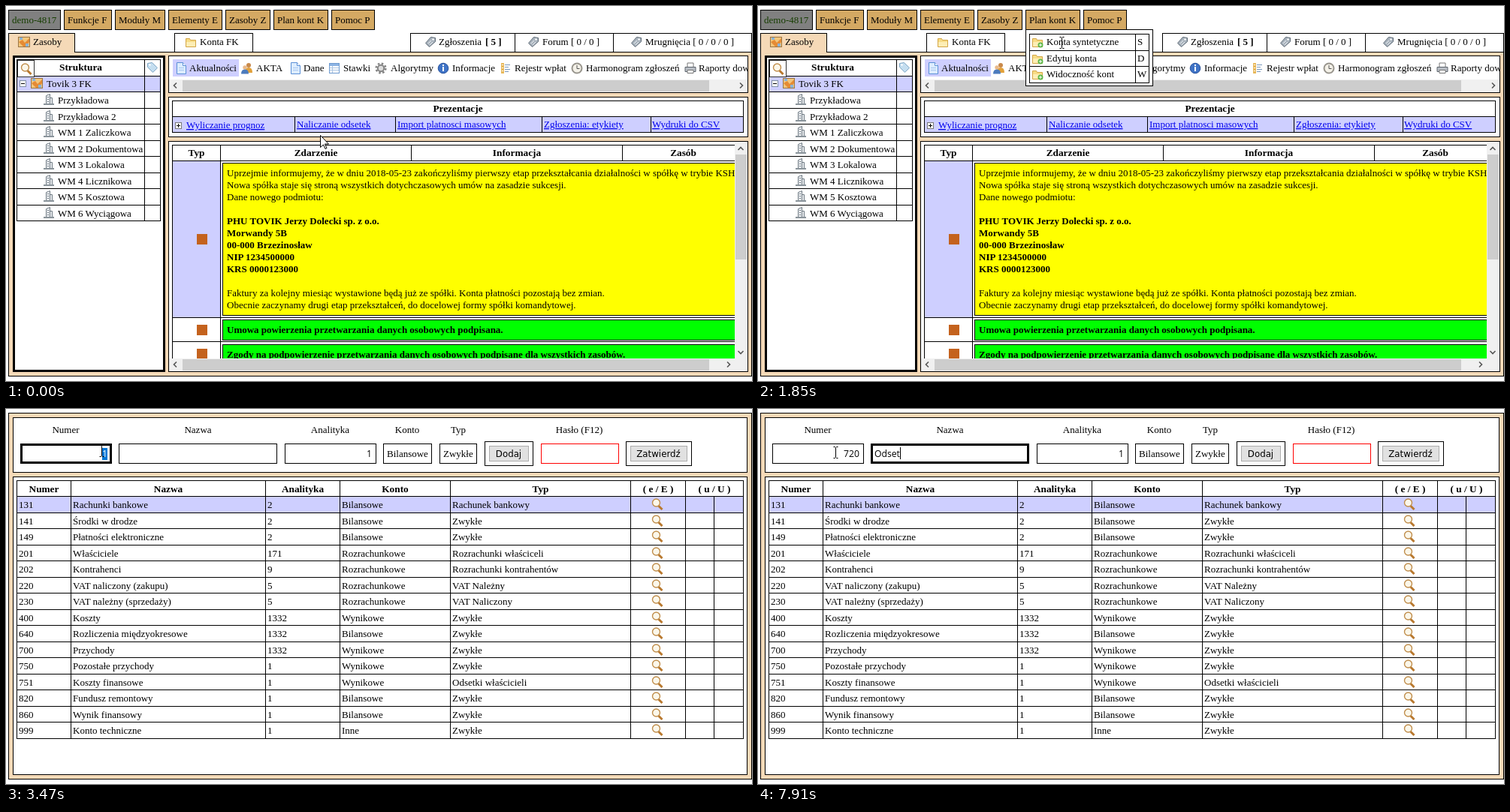
Write an HTML page that moves like this. It is 993x500 px and loops after 8 s.

```html
<!DOCTYPE html>
<html lang="pl">
<head>
<meta charset="utf-8">
<title>Plan kont</title>
<style>
html, body { margin: 0; width: 100%; height: 100%; overflow: hidden; background: #fff; }
#stage { display: block; width: 993px; height: 500px; }
text { font: 13px "Liberation Serif", "Times New Roman", serif; white-space: pre; }
rect { shape-rendering: crispEdges; }
.b { font-weight: bold; }
.h { font-weight: bold; font-size: 13.3px; }
.u { fill: #00e; text-decoration: underline; }
.in { font: 12.2px "Open Sans", sans-serif; }
.btn { font: 11.8px "DejaVu Sans", sans-serif; }
</style>
</head>
<body>
<svg id="stage" viewBox="0 0 993 500"></svg>
<script>
const WHEAT = '#f5d9b7', TAN = '#d4a963', LILAC = '#cecfff', LOOP = 8000;

// Drawing helpers; boxes are given by their outer border pixels.
const fill = (x, y, w, h, c) => `<rect x="${x}" y="${y}" width="${w}" height="${h}" fill="${c}"/>`;
const box = (x, y, x2, y2, c = '#fff', line = '#000', w = 1) =>
  `<rect x="${x + w / 2}" y="${y + w / 2}" width="${x2 - x + 1 - w}" height="${y2 - y + 1 - w}" fill="${c}" stroke="${line}" stroke-width="${w}"/>`;
const hline = (x, y, x2) => fill(x, y, x2 - x + 1, 1, '#000');
const vline = (x, y, y2) => fill(x, y, 1, y2 - y + 1, '#000');
const text = (x, y, s, cls = '', anchor = 'start', c = '#000') =>
  `<text x="${x}" y="${y}" class="${cls}" text-anchor="${anchor}" ${cls === 'u' ? '' : `fill="${c}"`}>${s}</text>`;
const mid = (x, y, s, cls = 'h') => text(x, y, s, cls, 'middle');
const clip = (x, y, w, h, body) =>
  `<svg x="${x}" y="${y}" width="${w}" height="${h}" viewBox="${x} ${y} ${w} ${h}">${body}</svg>`;
const path = (d, c, line = 'none', w = 1) => `<path d="${d}" fill="${c}" stroke="${line}" stroke-width="${w}"/>`;
const disc = (x, y, r, c, line = 'none', w = 1) =>
  `<circle cx="${x}" cy="${y}" r="${r}" fill="${c}" stroke="${line}" stroke-width="${w}"/>`;

const icons = {
  folder: path('M1.5 3.5h5l1 2h7v9h-13z', '#f7dc86', '#d3a545') + path('M2 8h12v6H2z', '#fdeeb5'),
  map: box(0, 1, 15, 14, '#f2c67c', '#9b7645') + path('M1 8l5-3 3 4 6-6v5l-5 6H7z', '#e58b35')
    + path('M2 2h4v3H2zM10 10h4v4h-4z', '#8ab4d8'),
  tag: path('M1.5 2.5l6-1 7 7-6 6-7-7z', '#c4def0', '#7fa6c4') + disc(4.5, 4.5, 1.2, '#fff'),
  darkTag: path('M14.5 2.5l-6-1-7 8 5 5 8-7z', '#a9b3bd', '#5e6a76') + disc(11.5, 4.5, 1.2, '#fff')
    + path('M5 10l4-4M7 12l4-4', 'none', '#eef2f5'),
  doc: path('M2.5.5h8l4 4v11h-12z', '#dcecff', '#5b8fd6') + path('M10.5.5v4h4', '#fff', '#5b8fd6')
    + path('M5 7.5h7M5 10.5h7', 'none', '#a9c8ee'),
  people: disc(10, 4, 3, '#c98a4b') + path('M5 14q0-7 5-7t5 7z', '#e2a13a') + disc(5, 7, 2.7, '#e9b98a')
    + path('M0 15.5q0-6 5-6t5 6z', '#4c7bbd'),
  sheet: box(1, 1, 14, 14, '#fff', '#6f9bd0') + fill(2, 2, 12, 3, '#8db4e3') + path('M2 7.5h12M2 10.5h12M5.500 5v9', 'none', '#a9c3e2'),
  gear: disc(8, 8, 6.3, 'none', '#858585', 2.6).replace('/>', ' stroke-dasharray="2.5 2.45"/>') + disc(8, 8, 4.2, '#ddd', '#858585', 2),
  info: disc(8, 8, 6.8, '#3f73c6', '#27519b') + fill(7, 3, 2, 2, '#fff') + fill(7, 6, 2, 6, '#fff'),
  list: fill(2, 1, 4, 14, '#e8b95c') + path('M3 3.500h2M3 7.500h2M3 11.500h2', 'none', '#fff')
    + path('M7 3.500h7M7 6.500h5M7 9.500h7M7 12.500h5', 'none', '#7897bd'),
  clock: disc(8, 8, 6.5, '#f4f1e8', '#98958d', 2) + path('M8 4v4.500h3.500', 'none', '#555'),
  printer: path('M4 1h8v6H4z', '#fff', '#777') + path('M1 6.500h14v6H1z', '#b9bec5', '#5f666e') + path('M4 10.500h8v4H4z', '#fff', '#777'),
  house: path('M4.500 2.500l5-2v13h-5zM9.500 5.500h3v8h-3z', '#e9ecef', '#6f7a83')
    + path('M6 4.500h2M6 7.500h2M6 10.500h2', 'none', '#6f7a83') + fill(1, 13, 14, 2, '#8a949b'),
  lens: path('M9.500 10l5 5', 'none', '#b9792f', 3) + disc(6.500, 6, 5, '#fbf7ea', '#c08e4c', 1.4)
};
icons.addFolder = icons.folder + disc(12, 12, 3.500, '#5eb648') + path('M10 12h4M12 10v4', 'none', '#fff');
const icon = (name, x, y) => `<g transform="translate(${x} ${y})">${icons[name]}</g>`;

const chevron = (x, y, angle) =>
  `<path transform="translate(${x} ${y}) rotate(${angle})" d="M-3.500 2L0-1.500 3.500 2" fill="none" stroke="#555" stroke-width="1.6"/>`;
const hscroll = (y, right) => fill(217, y, right - 217, 17, '#f0f0f0') + fill(235, y + 1, 701, 15, '#cdcdcd')
  + chevron(225, y + 8, -90) + chevron(right - 8, y + 8, 90);

function menuBar() {
  const items = [[3, 72, 'demo-4817'], [77, 140, 'Funkcje F'], [145, 211, 'Moduły M'], [216, 287, 'Elementy E'],
    [292, 351, 'Zasoby Z'], [356, 428, 'Plan kont K'], [433, 490, 'Pomoc P']];
  return items.map(([x, x2, s], i) => box(x, 5, x2, 31, i ? TAN : '#808080')
    + text(x + 5, 23, s, '', 'start', i ? '#000' : '#163d00')).join('');
}

function tabs() {
  return box(3, 36, 91, 62, WHEAT) + icon('map', 16, 40) + text(36, 52, 'Zasoby')
    + box(224, 36, 328, 61) + icon('folder', 238, 40) + text(258, 52, 'Konta FK')
    + box(538, 36, 992, 61) + vline(677, 36, 60) + vline(808, 36, 60)
    + icon('darkTag', 557, 40) + text(576, 52, 'Zgłoszenia') + text(638, 52, '[ 5 ]', 'b')
    + icon('darkTag', 694, 40) + text(714, 52, 'Forum [ 0 / 0 ]')
    + icon('darkTag', 831, 40) + text(851, 52, 'Mrugnięcia [ 0 / 0 / 0 ]')
    + box(3, 61, 992, 493, WHEAT) + fill(4, 61, 87, 1, WHEAT);
}

function tree() {
  const rows = ['Przykładowa', 'Przykładowa 2', 'WM 1 Zaliczkowa', 'WM 2 Dokumentowa', 'WM 3 Lokalowa',
    'WM 4 Licznikowa', 'WM 5 Kosztowa', 'WM 6 Wyciągowa'];
  let out = box(9, 66, 211, 487, '#fff', '#000', 3) + box(14, 71, 205, 286) + fill(15, 94, 190, 20, LILAC)
    + hline(14, 93, 205) + box(15, 72, 37, 94, '#fff', '#333') + icon('lens', 19, 76)
    + mid(99.500, 86, 'Struktura') + icon('tag', 187, 74)
    + box(18, 99, 26, 107, '#fff', '#8190a5') + hline(20, 103, 24) + icon('map', 33, 95) + text(54, 108, 'Tovik 3 FK');
  rows.forEach((s, i) => {
    const y = Math.round(114 + 21.500 * i);
    out += hline(14, y, 205) + icon('house', 49, y + 3) + text(69, y + 16, s);
  });
  return out + vline(184, 71, 286);
}

function toolbar() {
  const items = [['doc', 225, 244, 'Aktualności'], ['people', 313, 333, 'AKTA'], ['doc', 377, 396, 'Dane'],
    ['sheet', 429, 449, 'Stawki'], ['gear', 491, 512, 'Algorytmy'], ['info', 574, 594, 'Informacje'],
    ['list', 657, 677, 'Rejestr wpłat'], ['clock', 752, 772, 'Harmonogram zgłoszeń'], ['printer', 903, 922, 'Raporty dowolne']];
  return box(216, 66, 987, 115) + fill(222, 71, 88, 23, LILAC)
    + clip(217, 67, 770, 31, items.map(([name, x, tx, s]) => icon(name, x, 75) + text(tx, 87, s)).join(''))
    + hscroll(98, 987);
}

function links() {
  const items = [[240, 'Wyliczanie prognoz'], [387, 'Naliczanie odsetek'], [521, 'Import platnosci masowych'],
    [716, 'Zgłoszenia: etykiety'], [860, 'Wydruki do CSV']];
  return box(216, 121, 987, 174) + box(221, 126, 981, 168) + mid(601.500, 141, 'Prezentacje')
    + box(221, 147, 981, 168, LILAC) + [384, 518, 713, 858].map(x => vline(x, 147, 168)).join('')
    + box(225, 155, 233, 163, '#fff', '#777') + hline(227, 159, 231) + vline(229, 157, 161)
    + items.map(([x, s], i) => text(x, i ? 162 : 163, s, 'u')).join('');
}

function news() {
  const lines = ['Uprzejmie informujemy, że w dniu 2018-05-23 zakończyliśmy pierwszy etap przekształcania działalności w spółkę w trybie KSH',
    'Nowa spółka staje się stroną wszystkich dotychczasowych umów na zasadzie sukcesji.', 'Dane nowego podmiotu:', '',
    'PHU TOVIK Jerzy Dolecki sp. z o.o.', 'Morwandy 5B', '00-000 Brzezinosław', 'NIP 1234500000', 'KRS 0000123000', '',
    'Faktury za kolejny miesiąc wystawione będą już ze spółki. Konta płatności pozostają bez zmian.',
    'Obecnie zaczynamy drugi etap przekształceń, do docelowej formy spółki komandytowej.'];
  const mark = y => fill(254, y - 7, 14, 14, '#c4621d');
  const note = (y, y2, s) => box(288, y, 1000, y2, '#0f0') + text(294, y + 18, s, 'b');
  const table = fill(221, 207, 64, 208, LILAC) + hline(221, 185, 1000) + hline(221, 206, 1000)
    + hline(221, 415, 1000) + hline(221, 447, 1000) + vline(221, 185, 470) + vline(285, 185, 470)
    + vline(539, 185, 206) + vline(820, 185, 206)
    + mid(253.500, 200, 'Typ') + mid(412.500, 200, 'Zdarzenie') + mid(680, 200, 'Informacja') + mid(901.500, 200, 'Zasób')
    + box(288, 209, 1000, 412, '#ff0')
    + lines.map((s, i) => text(294, 227 + 16 * i, s, i > 3 && i < 9 ? 'b' : '')).join('')
    + note(418, 445, 'Umowa powierzenia przetwarzania danych osobowych podpisana.')
    + note(451, 480, 'Zgody na podpowierzenie przetwarzania danych osobowych podpisane dla wszystkich zasobów.')
    + mark(311) + mark(432) + mark(464);
  return box(216, 180, 987, 487) + clip(217, 181, 753, 289, table)
    + fill(970, 181, 17, 306, '#f0f0f0') + fill(971, 198, 15, 140, '#cdcdcd')
    + chevron(978, 190, 0) + chevron(978, 462, 180) + hscroll(470, 970);
}

function popup() {
  const items = [['Konta syntetyczne', 'S'], ['Edytuj konta', 'D'], ['Widoczność kont', 'W']];
  return box(356, 31, 525, 106) + box(361, 37, 520, 102) + vline(502, 37, 102) + items.map(([s, key], i) => {
    const y = Math.round(37 + 21.500 * i);
    return (i ? hline(361, y, 520) : '') + icon('addFolder', 364, y + 3) + text(384, y + 15, s) + text(505, y + 15, key);
  }).join('');
}

function form() {
  const labels = [[79.500, 'Numer'], [255.500, 'Nazwa'], [431.500, 'Analityka'], [534, 'Konto'], [602, 'Typ'], [763, 'Hasło (F12)']];
  const button = (x, x2, s) => box(x, 43, x2, 75) + box(x + 6, 49, x2 - 6, 69, '#e1e1e1', '#adadad') + mid((x + x2) / 2, 64, s, 'btn');
  return box(3, 5, 992, 493, WHEAT) + box(9, 11, 986, 84) + box(9, 90, 986, 487)
    + labels.map(([x, s]) => mid(x, 32, s, '')).join('')
    + box(371, 46, 492, 72) + text(487, 64, '1', 'in', 'end')
    + box(502, 46, 566, 72) + text(507, 64, 'Bilansowe') + box(577, 46, 626, 72) + text(582, 64, 'Zwykłe')
    + button(637, 701, 'Dodaj') + box(712, 46, 815, 72, '#fff', '#f00') + button(825, 912, 'Zatwierdź');
}

function accounts() {
  const rows = `131|Rachunki bankowe|2|Bilansowe|Rachunek bankowy
141|Środki w drodze|2|Bilansowe|Zwykłe
149|Płatności elektroniczne|2|Bilansowe|Zwykłe
201|Właściciele|171|Rozrachunkowe|Rozrachunki właściceli
202|Kontrahenci|9|Rozrachunkowe|Rozrachunki kontrahentów
220|VAT naliczony (zakupu)|5|Rozrachunkowe|VAT Należny
230|VAT należny (sprzedaży)|5|Rozrachunkowe|VAT Naliczony
400|Koszty|1332|Wynikowe|Zwykłe
640|Rozliczenia międzyokresowe|1332|Bilansowe|Zwykłe
700|Przychody|1332|Wynikowe|Zwykłe
750|Pozostałe przychody|1|Wynikowe|Zwykłe
751|Koszty finansowe|1|Wynikowe|Odsetki właścicieli
820|Fundusz remontowy|1|Bilansowe|Zwykłe
860|Wynik finansowy|1|Bilansowe|Zwykłe
999|Konto techniczne|1|Inne|Zwykłe`.split('\n');
  const cols = [14, 86, 345, 444, 591, 831, 904, 981];
  const heads = ['Numer', 'Nazwa', 'Analityka', 'Konto', 'Typ', '( e / E )', '( u / U )'];
  let out = box(14, 95, 981, 439) + fill(15, 117, 966, 21, LILAC);
  heads.forEach((s, i) => out += mid((cols[i] + cols[i + 1]) / 2 + .5, 111, s) + vline(cols[i], 95, 439));
  rows.forEach((row, i) => {
    const y = Math.round(116 + 21.530 * i);
    out += hline(14, y, 981) + row.split('|').map((s, k) => text(cols[k] + (k ? 3 : 3), y + 16, s)).join('') + icon('lens', 859, y + 3);
  });
  return out + vline(942, 116, 439);
}

const cursors = {
  arrow: path('M.5.5V16.500L4.500 13L7 18.500L9 17.500L6.500 12H11.500Z', '#fff', '#000'),
  hand: path('M-1 12V2a1.500 1.500 0 0 1 3 0V7l5 1q2 .5 2 2.500v5l-1.500 5.500H0L-5 13.500q0-3 4-.5zM2.500 7v4M5 8v3.500M7.200 8.500v3', '#fff', '#000'),
  beam: path('M-2.500-7.500H-.5L.5-6.500L1.500-7.500H3.500M.5-6.500V6.500M-2.500 7.500H-.5L.5 6.500L1.500 7.500H3.500', 'none', '#000')
};

const stage = document.getElementById('stage');
stage.innerHTML = `<g id="home">${menuBar() + tabs() + tree() + toolbar() + links() + news()}<g id="popup">${popup()}</g></g>
<g id="plan">${form() + accounts()}<g id="fields"></g></g><g id="cursor"></g>`;
const [home, menu, plan, fields, cursor] = ['home', 'popup', 'plan', 'fields', 'cursor'].map(id => document.getElementById(id));
const show = (el, on) => el.style.display = on ? '' : 'none';

// Typing: start time, number, name, focused field, caret shown.
const typing = [[0, '1', '', 0, 0], [5170, '7', '', 0, 1], [5330, '72', '', 0, 1], [5630, '720', '', 0, 1], [5800, '720', '', 0, 0],
  [5950, '720', '', 1, 1], [6500, '720', '', 1, 0], [6970, '720', '', 1, 1], [7060, '720', 'O', 1, 1], [7350, '720', 'Od', 1, 1],
  [7520, '720', 'Ods', 1, 1], [7760, '720', 'Odse', 1, 1], [7910, '720', 'Odset', 1, 1]];
let shown;

function drawFields(t) {
  const state = typing.findLast(s => t >= s[0]);
  if (state === shown) return;
  shown = state;
  const [start, number, name, focus, caret] = state;
  const selected = !start;
  fields.innerHTML = box(19, 46, 140, 72, '#fff', '#000', focus ? 1 : 3) + box(150, 46, 360, 72, '#fff', '#000', focus ? 3 : 1)
    + (selected ? fill(128, 52, 7, 16, '#0078d7') : '')
    + text(135, 64, number, 'in', 'end', selected ? '#fff' : '#000') + text(155, 64, name, 'in');
  if (!caret) return;
  const x = focus ? 155 + Math.round(fields.lastChild.getComputedTextLength()) : 134;
  fields.insertAdjacentHTML('beforeend', vline(x, 51, 66));
}

// Pointer moves: first step, last step, number of steps, end point.
const moves = [[70, 300, 4, 375, 14], [470, 540, 2, 388, 19], [1000, 1390, 6, 404, 49], [1930, 1930, 1, 402, 48],
  [2780, 3550, 11, 101, 57], [3630, 3630, 1, 103, 58]];

function pointer(t) {
  let x = 418, y = 172;
  for (const [from, to, n, ex, ey] of moves) {
    if (t < from) break;
    const step = n > 1 ? Math.floor((t - from) / (to - from) * (n - 1) + 1e-6) + 1 : 1;
    const p = Math.min(1, step / n), k = p * p * (3 - 2 * p);
    x += (ex - x) * k;
    y += (ey - y) * k;
  }
  return [Math.round(x), Math.round(y)];
}

function shape(t, x, y) {
  if (t < 1930) return y < 32 ? 'hand' : t > 710 ? 'beam' : 'arrow';
  if (t < 2780) return 'arrow';
  return x < 140 || (x > 150 && x < 361) || x > 371 ? 'beam' : 'arrow';
}

function draw() {
  const t = performance.now() % LOOP, [x, y] = pointer(t);
  show(home, t < 1930);
  show(menu, t >= 710);
  show(plan, t >= 2000);
  drawFields(t);
  const kind = shape(t, x, y);
  if (cursor.dataset.kind !== kind) cursor.innerHTML = cursors[cursor.dataset.kind = kind];
  cursor.setAttribute('transform', `translate(${x} ${y})`);
  requestAnimationFrame(draw);
}
draw();
</script>
</body>
</html>
```
